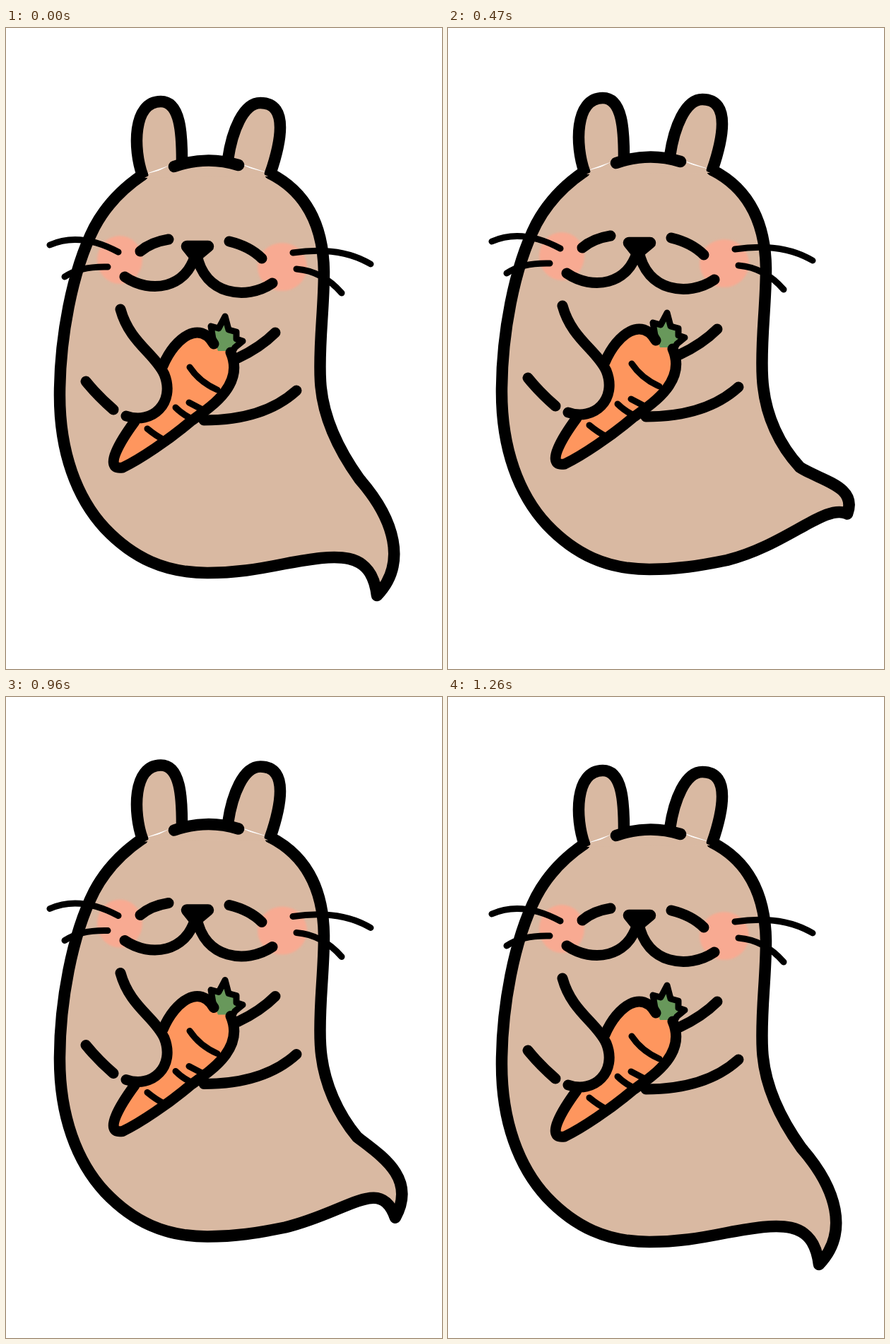
An HTML page that plays this animation: 617 by 907 pixels, repeating every 1.36 s.

```html
<!DOCTYPE html>
<html lang="en">
<head>
<meta charset="utf-8">
<title>Carrot hug</title>
<style>
  html, body { margin: 0; width: 100%; height: 100%; overflow: hidden; background: #fff; }
  svg { display: block; width: 100%; height: 100%; }
  .ink { fill: none; stroke: #000; stroke-width: 15; stroke-linecap: round; stroke-linejoin: round; }
  .skin { fill: #d9b9a2; }
  .bold { stroke-width: 16.5; }
  .thin { stroke-width: 9; }
</style>
</head>
<body>
<svg viewBox="0 0 617 907">
  <defs>
    <filter id="soft" x="-20%" y="-20%" width="140%" height="140%"><feGaussianBlur stdDeviation="1.6"/></filter>
  </defs>
  <g id="pet">
    <path class="skin" d="M193 208 238 196 329 194 374 206Z"/>
    <path id="body" class="ink skin bold"/>
    <!-- ears and crown -->
    <g class="ink bold">
      <path class="skin" d="M193 208C180 172 179 104 219 104C247 104 249 150 249 188"/>
      <path class="skin" d="M314 186C320 145 336 106 360 106C402 106 388 165 374 206"/>
      <path class="skin" stroke="none" style="stroke:none" d="M196 212 240 190 Q284 182 327 190L371 210Z"/>
      <path d="M238 196Q284 180 329 194"/>
    </g>
    <g fill="#f8aa92" filter="url(#soft)">
      <ellipse cx="161" cy="328" rx="32" ry="34"/>
      <ellipse cx="391" cy="338" rx="35" ry="34"/>
    </g>
    <path class="ink thin" d="M62 307Q105 288 159 317M83 352Q105 337 144 338M406 318Q472 308 516 334M411 341Q448 344 475 375"/>
    <!-- eyes, nose, mouth -->
    <path class="ink" d="M190 316Q205 303 230 299M316 302Q345 309 362 326"/>
    <path class="ink" d="M268 320C256 368 205 377 168 352M270 320C280 378 340 386 377 361"/>
    <path class="ink bold" style="fill:#000" d="M256 309H286L274 319H264Z"/>
    <!-- carrot -->
    <path fill="#fe965e" d="M222 478C240 436 275 414 294 447L318 459C338 505 290 536 262 556C230 583 190 610 165 622C135 626 165 580 182 557C222 550 236 520 224 490Z"/>
    <path fill="#68985b" d="M290 432 310 414 326 431 331 445 318 457H300Z"/>
    <path class="ink" d="M222 478C240 436 275 414 294 447M318 459C338 505 290 536 262 556C230 583 190 610 165 622C135 626 165 580 182 557"/>
    <path class="ink thin" d="M260 480Q274 501 299 512M259 530 278 540M240 537Q252 549 268 555M200 567Q212 577 224 583"/>
    <path class="ink thin" d="M293 440 290 422 301 425 310 408 315 427 326 430V440L335 443 324 452 319 461"/>
    <!-- arms -->
    <path class="ink" d="M162 398C175 445 210 460 224 490C240 530 207 562 170 549M113 500Q130 521 152 540M381 431Q360 452 328 467M411 513Q365 555 280 555"/>
  </g>
</svg>
<script>
const $ = id => document.getElementById(id);
const FRAMES = 16, TOP = 7, CURL = 3;

// Tail curve in three poses: knee, tip and hip with their handles
const hang = [475, 603, 500, 638, 550, 695, 568, 758, 525, 803, 517, 738, 470, 744];
const curl = [472, 600, 497, 630, 530, 655, 582, 685, 552, 741, 530, 683, 485, 736];
const lift = [472, 597, 500, 625, 530, 650, 572, 643, 570, 658, 535, 692, 465, 741];

// Bends smoothly through the three poses as u runs from 0 to TOP
function tail(u) {
  const a = (u - CURL) * (u - TOP) / (CURL * TOP);
  const b = u * (u - TOP) / (CURL * (CURL - TOP));
  return hang.map((v, i) => a * v + b * curl[i] + (1 - a - b) * lift[i]);
}

function outline(i) {
  const step = Math.min(i, FRAMES - 1 - i);
  const u = step - 0.35 * Math.sin(2 * Math.PI * step / TOP);
  return 'M374 206C425 232 449 280 450 345C450 400 442 450 445 500C448 555 ' + tail(u).join(' ') +
    ' 395 758C355 766 325 771 285 771C225 771 180 750 140 708' +
    'C100 665 76 600 76 520C76 440 93 345 125 282C142 250 165 227 193 208';
}

// Height of the float at a few steps, straight in between
const floats = [[0, 0], [3, -4], [7, -6], [10, -5], [12, -7.5], [15, 0]];
function bob(i) {
  const k = Math.max(1, floats.findIndex(p => p[0] >= i));
  const [i0, y0] = floats[k - 1], [i1, y1] = floats[k];
  return y0 + (y1 - y0) * (i - i0) / (i1 - i0);
}

const hold = i => i > 3 && i < 12 ? 70 : 100;
let loop = 0;
for (let i = 0; i < FRAMES; i++) loop += hold(i);

function draw() {
  let t = performance.now() % loop, i = 0;
  while (t >= hold(i)) t -= hold(i++);
  $('body').setAttribute('d', outline(i));
  $('pet').setAttribute('transform', `translate(0 ${bob(i)})`);
  requestAnimationFrame(draw);
}
draw();
</script>
</body>
</html>
```
